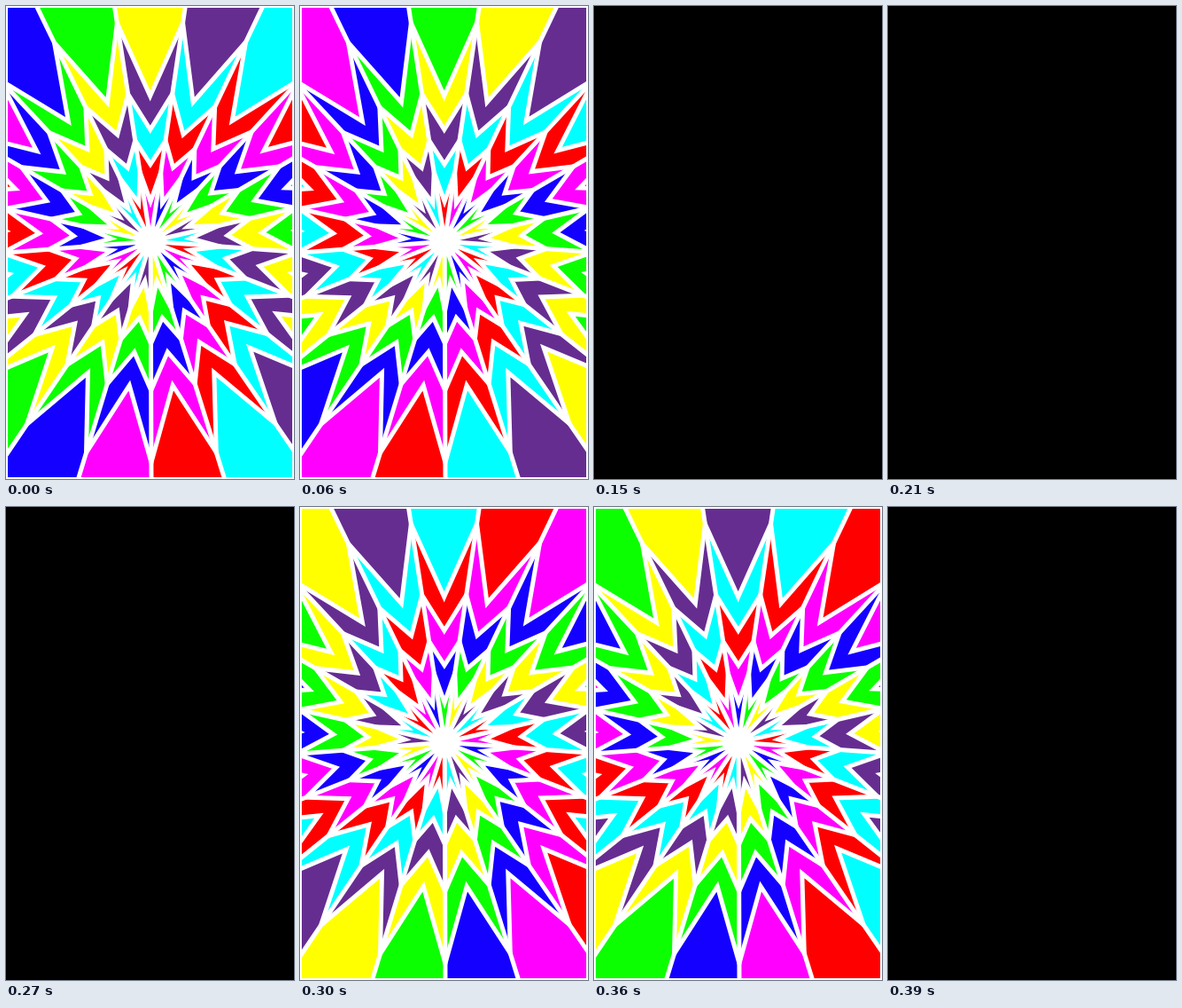
An HTML page with a canvas that plays this animation: 325x533 px, repeating every 0.42 s.

```html
<!DOCTYPE html>
<html>
<head>
<meta charset="utf-8">
<style>
  html, body { margin: 0; width: 100%; height: 100%; overflow: hidden; background: #000; }
  canvas { display: block; }
</style>
</head>
<body>
<canvas id="stage" width="325" height="533"></canvas>
<script>
const W = 325, H = 533, CX = 163.2, CY = 265.3, TILT = -0.003;
const COLUMNS = 21, STEP_MS = 30;
const SECTOR = 2 * Math.PI / COLUMNS;
const COLORS = ['#ff0', '#662d91', '#0ff', '#f00', '#f0f', '#1400ff', '#0cff00'];
// Radii of each zigzag: [on the spokes, at the middle of a column]
const ZIGZAGS = [[249, 164], [168, 126], [115, 87], [79, 45]];
const ctx = document.getElementById('stage').getContext('2d');

function lineTo(radius, column) {
  const angle = column * SECTOR + TILT;
  ctx.lineTo(CX + radius * Math.sin(angle), CY - radius * Math.cos(angle));
}

function fillWedge(column, tip, notch, color) {
  ctx.beginPath();
  ctx.moveTo(CX, CY);
  lineTo(tip, column - 0.5);
  lineTo(notch, column);
  lineTo(tip, column + 0.5);
  ctx.fillStyle = color;
  ctx.fill();
}

function drawBurst(shift) {
  ctx.fillStyle = '#fff';
  ctx.fillRect(0, 0, W, H);
  [[400, 400], ...ZIGZAGS].forEach(([tip, notch], ring) => {
    for (let c = 0; c < COLUMNS; c++) {
      fillWedge(c, tip, notch, COLORS[(c + ring - shift + 7) % 7]);
    }
  });

  ctx.strokeStyle = '#fff';
  ctx.lineWidth = 5;
  ctx.beginPath();
  for (let c = 0; c < COLUMNS; c++) {
    ctx.moveTo(CX, CY);
    lineTo(400, c + 0.5);
  }
  ctx.stroke();
  for (const [tip, notch] of ZIGZAGS) {
    ctx.beginPath();
    for (let c = 0; c < COLUMNS; c++) {
      lineTo(notch, c);
      lineTo(tip, c + 0.5);
    }
    ctx.closePath();
    ctx.stroke();
  }
  ctx.lineWidth = 4;
  ctx.strokeRect(0, 0, W, H);
}

function render() {
  const step = Math.floor(performance.now() / STEP_MS) % 14;
  if (step % 2) {
    ctx.fillStyle = '#000';
    ctx.fillRect(0, 0, W, H);
  } else {
    drawBurst(step / 2);
  }
  requestAnimationFrame(render);
}
render();
</script>
</body>
</html>
```
